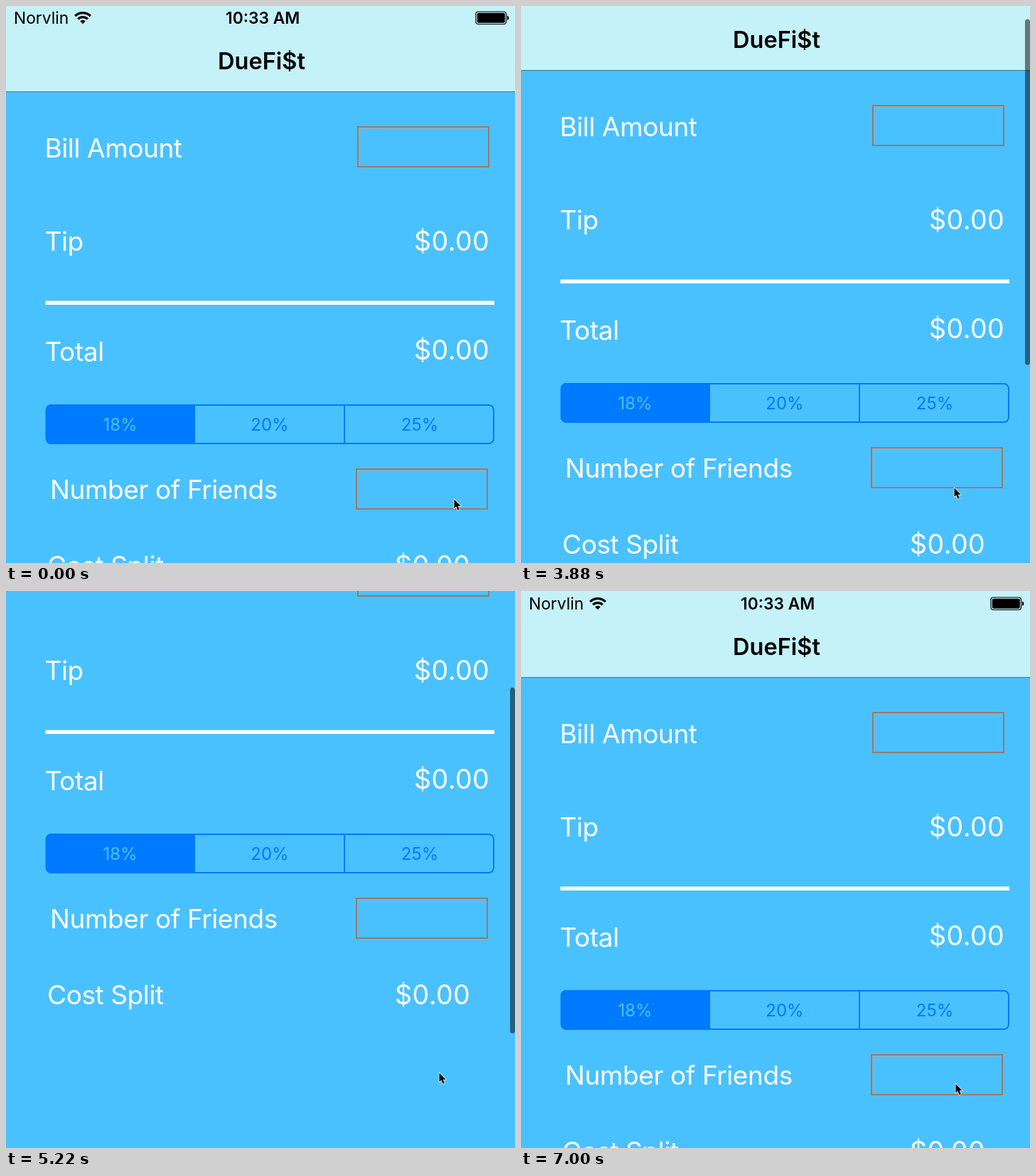
Write an HTML page that moves like this. It is 716 px wide and 783 px high and loops after 8 s.

```html
<!DOCTYPE html>
<html lang="en">
<head>
<meta charset="utf-8">
<title>Tip calculator</title>
<style>
  html, body { margin: 0; width: 100%; height: 100%; overflow: hidden; background: #4ac1ff; }
  svg { display: block; width: 100vw; height: 100vh; }
  text { font-family: Inter, Roboto, sans-serif; }
  .label { font-size: 37px; fill: #fff; letter-spacing: -.4px; }
  .amount { font-size: 37.5px; fill: #fff; letter-spacing: .45px; }
  .seg { font-size: 24px; fill: #007aff; text-anchor: middle; }
  .status { font-size: 22.8px; }
  .mid { text-anchor: middle; font-weight: 600; }
</style>
</head>
<body>
<svg viewBox="0 0 716 783">
  <defs>
    <g id="field" fill="none">
      <path d="M2.5 56V2.75H184" stroke="#a3a9ae" stroke-width="1.5"/>
      <rect x="1" y="1" width="184" height="56" stroke="#957b70" stroke-width="2"/>
    </g>
  </defs>
  <rect width="716" height="783" fill="#4ac1ff"/>
  <g id="page">
    <rect y="-60" width="716" height="180" fill="#c5f1f8"/>
    <rect y="120" width="716" height="1" fill="#3a7a98"/>

    <text class="status" x="11" y="25">Norvlin</text>
    <g fill="none" stroke="#000" stroke-width="3.2">
      <path d="M97.2 14.2a15.2 15.2 0 0 1 21.6 0"/>
      <path d="M101.2 18.4a9.6 9.6 0 0 1 13.6 0"/>
    </g>
    <path d="M108 25.2l-3.8-3.9a5.4 5.4 0 0 1 7.6 0z"/>
    <text class="status mid" x="361.2" y="25">10:33 AM</text>
    <rect x="661" y="8" width="42.5" height="17.5" rx="3.5" fill="none" stroke="#000" stroke-width="1.2"/>
    <rect x="662.8" y="9.8" width="39" height="14" rx="2"/>
    <path d="M705 13.5q2.4.6 2.4 3.2t-2.4 3.2z"/>
    <text class="mid" x="359.5" y="89" font-size="32.5">DueFi$t</text>

    <text class="label" x="54.5" y="213">Bill Amount</text>
    <text class="label" x="54.5" y="344">Tip</text>
    <text class="label" x="54.5" y="499">Total</text>
    <text class="label" x="62" y="692.5">Number of Friends</text>
    <text class="label" x="58" y="800">Cost Split</text>
    <text class="amount" x="574" y="344">$0.00</text>
    <text class="amount" x="574" y="497">$0.00</text>
    <text class="amount" x="547" y="800">$0.00</text>
    <use href="#field" x="494" y="169"/>
    <use href="#field" x="492" y="650"/>
    <rect x="55.5" y="414.5" width="631.5" height="5.5" fill="#fff"/>

    <path d="M266 560H64a8 8 0 0 0-8 8v39.5a8 8 0 0 0 8 8h202z" fill="#007aff"/>
    <rect x="56.5" y="561" width="629.5" height="54" rx="7" fill="none" stroke="#007aff" stroke-width="2"/>
    <path d="M476 561v54" stroke="#007aff" stroke-width="2"/>
    <text class="seg" x="160.5" y="597" style="fill:#4ac1ff">18%</text>
    <text class="seg" x="371" y="597">20%</text>
    <text class="seg" x="582" y="597">25%</text>
  </g>
  <rect id="bar" x="709" width="7" rx="3.5"/>
  <path id="cursor" d="M0 0v12.6l2.8-2.5 2.2 5.2 2.4-1.1-2.2-5h4z" stroke="#fff" stroke-width="1.4" paint-order="stroke"/>
</svg>
<script>
  const $ = id => document.getElementById(id);
  const LOOP = 8000, TICK = 148.9;   // the picture changes in ticks
  const PULL = 233, BOUNCE = 1;      // scroll distance, overshoot at the top
  const BAR = 486, BAR_RATE = .62;

  function set(id, attrs) {
    for (const name in attrs) $(id).setAttribute(name, attrs[name]);
  }

  // Progress from 0 to 1 between two ticks: quick start, soft landing
  function ease(n, from, to) {
    const u = Math.min(1, Math.max(0, (n - from) / (to - from)));
    return .5 - .5 * Math.cos(Math.PI * u ** .75);
  }

  function draw(ms) {
    const n = Math.floor(ms % LOOP / TICK);

    const y = Math.round(PULL * ease(n, 25, 32) - (PULL + BOUNCE) * ease(n, 34.3, 42.65));
    set('page', { transform: `translate(0 ${-y})` });
    set('bar', {
      y: Math.max(0, y * BAR_RATE),
      height: BAR + Math.min(0, y),
      opacity: .5 * (ease(n, 20, 22) - ease(n, 44, 47))
    });

    const arc = 28 * Math.sin(Math.PI * Math.min(1, n / 5));
    const cx = 630.5 - 19.5 * ease(n, 0, 5) - 1.5 * ease(n, 11, 12) + 2 * ease(n, 42, 47);
    const cy = 693.5 - 16 * ease(n, 0, 5) - arc + 15.5 * ease(n, 42, 47);
    set('cursor', { transform: `translate(${cx} ${cy})` });
  }

  const start = performance.now();
  function loop() {
    draw(performance.now() - start);
    requestAnimationFrame(loop);
  }
  loop();
</script>
</body>
</html>
```
